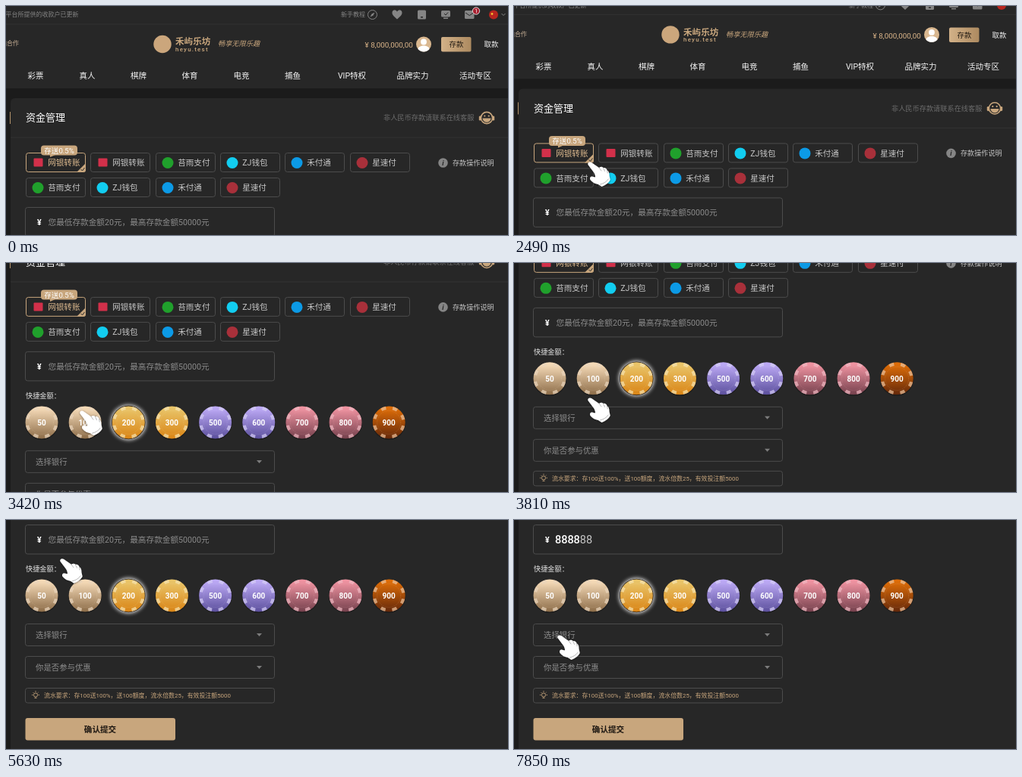
An HTML page for the animation above (8 s loop, 661 by 303 pixels).

```html
<!DOCTYPE html>
<html lang="zh-CN">
<head>
<meta charset="utf-8">
<title>资金管理</title>
<style>
  html, body { margin: 0; width: 100%; height: 100%; overflow: hidden; background: #1b1b1b; }
  svg { display: block; width: 100%; height: 100%; }
  text { font-family: Roboto, 'Noto Sans CJK SC', 'Noto Sans CJK', sans-serif; }
</style>
</head>
<body>
<svg id="stage" viewBox="0 0 661 303" preserveAspectRatio="none">
  <defs>
    <filter id="glow" x="-50%" y="-50%" width="200%" height="200%"><feGaussianBlur stdDeviation="2.6"/></filter>
    <filter id="soft" x="-50%" y="-50%" width="200%" height="200%">
      <feDropShadow dx="0" dy="0.5" stdDeviation="0.8" flood-color="#000" flood-opacity=".55"/>
    </filter>
    <linearGradient id="deposit"><stop stop-color="#d2b188"/><stop offset="1" stop-color="#ad8a60"/></linearGradient>
  </defs>
  <g id="page"></g>
  <g id="hand">
    <path filter="url(#soft)" fill="#fff" d="M.5 4C-.5 1 2.5-.5 5 1L15 8C17 6.500 19 6.300 20.500 8C23 7.500 25 9 25.700 11.500C28 12.500 28.500 15.500 28.500 18.500L29.700 24C27.500 28 23 31.500 18.500 33L14 30C10.500 29.500 6 27.500 3.500 24C2 21 4.500 18.500 7 20L10 20.500C10.300 19 9.500 16.500 8 14Z"/>
    <path fill="none" stroke="#888" stroke-width=".6" stroke-linecap="round" d="M15 8L18 12M20.500 8L22.500 12.500M25.700 11.500L26.200 15M16.500 30C21 29 25 26.500 27.300 23"/>
  </g>
</svg>
<script>
const LOOP = 8000;
const GOLD = '#c8a67d', PANEL = '#272727', LINE = '#4c4c4c', HAIR = '#333';
const NS = 'http://www.w3.org/2000/svg';
const page = document.getElementById('page');
const hand = document.getElementById('hand');
const defs = document.querySelector('defs');

function add(tag, attrs, parent = page) {
  const el = document.createElementNS(NS, tag);
  for (const k in attrs) el.setAttribute(k, attrs[k]);
  parent.appendChild(el);
  return el;
}
const rect = (x, y, width, height, fill, more) => add('rect', { x, y, width, height, fill, ...more });
const disc = (cx, cy, r, fill, more) => add('circle', { cx, cy, r, fill, ...more });
const path = (d, fill, more) => add('path', { d, fill, ...more });
const stroke = (d, color, width = 1) => path(d, 'none', { stroke: color, 'stroke-width': width });
const frame = (x, y, w, h, color = LINE) =>
  rect(x + .5, y + .5, w - 1, h - 1, 'none', { stroke: color, rx: 3 });

// y is the vertical middle of the line
function label(str, x, y, size, fill, more) {
  const el = add('text', { x, y: y + size * .37, 'font-size': size, fill, ...more });
  el.textContent = str;
  return el;
}
const centred = (str, x, y, size, fill, more) =>
  label(str, x, y, size, fill, { 'text-anchor': 'middle', ...more });

function topBar() {
  const grey = '#858585';
  rect(0, 0, 661, 109, PANEL);
  rect(0, 23.5, 661, 1, HAIR);
  label('平台所提供的收款户已更新', -.5, 11.5, 8, grey);
  label('新手教程', 441, 11.5, 8, grey);
  disc(482.5, 11.5, 6, 'none', { stroke: grey });
  path('M485.500 8.500L483.500 12.500L479.500 14.500L481.500 10.500Z', grey);
  path('M515 17.500C511 14 508.500 12 508.500 9C508.500 5 513 4 515 7.500C517 4 521.500 5 521.500 9C521.500 12 519 14 515 17.500Z', grey);
  rect(542, 5.5, 11, 12, grey, { rx: 1.5 });
  rect(546, 14, 3, 1.5, PANEL);
  rect(573, 6, 12, 8.5, grey, { rx: 1.5 });
  rect(576, 15.5, 6, 1.5, grey);
  stroke('M577 10L579 12L582 8.500', PANEL);
  rect(604, 6, 12.5, 11, grey, { rx: 1.5 });
  stroke('M605 9L610.300 12.500L615.500 9', PANEL);
  disc(619, 6.5, 4.6, '#a82030', { stroke: '#eee', 'stroke-width': .9 });
  centred('1', 619, 6.5, 7.5, '#fff');
  disc(642, 11.5, 6, '#b8261f');
  disc(640, 10.5, 1.4, '#f2c230');
  stroke('M652.500 10L655 12.500L657.500 10', grey);
}

function header() {
  label('站合作', 17, 49.5, 8, '#c4ad94', { 'text-anchor': 'end' });
  disc(206, 50.5, 11.7, '#cba67c');
  label('禾屿乐坊', 223, 47, 11.6, GOLD, { 'font-weight': 700 });
  label('heyu.test', 223, 57, 8, GOLD, { 'font-weight': 500, 'letter-spacing': 1.2 });
  label('畅享无限乐趣', 279, 50, 9.2, GOLD, { 'font-style': 'italic' });
  label('¥ 8,000,000,00', 472.5, 51.5, 9.9, '#dcb68a');
  disc(550, 50.5, 10, '#d9b78f');
  disc(550, 47.5, 3.9, '#fff');
  path('M542.500 57C543 51 557 51 557.500 57C554 61.500 546 61.500 542.500 57Z', '#fff');
  rect(573, 41, 39.5, 19.5, 'url(#deposit)', { rx: 2 });
  centred('存款', 593, 51, 9.4, '#241c14');
  centred('取款', 639, 51, 9.4, '#f2f2f2');

  const nav = { 彩票: 39, 真人: 107, 棋牌: 174.5, 体育: 242, 电竞: 310, 捕鱼: 377.5, VIP特权: 455.5, 品牌实力: 535.5, 活动专区: 618 };
  for (const name in nav) centred(name, nav[name], 92.5, 10.5, '#f4f4f4');
}

function payButton(col, row, name, color, square) {
  const x = Math.round(26 + col * 85.3), y = 194 + row * 33, on = !col && !row;
  frame(x, y, 79, 26, on ? GOLD : LINE);
  if (square) rect(x + 10.5, y + 7.5, 12, 11, color, { rx: 1 });
  else disc(x + 16, y + 13.5, 7.5, color);
  label(name, x + 29.2, y + 13.5, 10.6, on ? '#dcb98e' : '#c6c6c6');
  if (on) {
    path(`M${x + 79} ${y + 14}V${y + 23}Q${x + 79} ${y + 26} ${x + 76} ${y + 26}H${x + 67}Z`, GOLD);
    stroke(`M${x + 72.5} ${y + 22}L${x + 74.5} ${y + 24}L${x + 77.5} ${y + 20}`, '#2a2a2a');
  }
}

function payments() {
  path('M6 570V128Q6 122 12 122H661V570Z', PANEL);
  rect(6, 173.5, 655, 1, HAIR);
  rect(5, 140, 1, 16, '#b3936a');
  label('资金管理', 26, 147.5, 13, '#fff', { 'font-weight': 500 });
  label('非人民币存款请联系在线客服', 497, 148, 9.2, '#6c6c6c');

  // headset face
  disc(633, 148, 7.6, 'none', { stroke: GOLD, 'stroke-width': 1.6 });
  rect(622.8, 145.5, 3, 6, GOLD, { rx: 1.3 });
  rect(640.2, 145.5, 3, 6, GOLD, { rx: 1.3 });
  path('M627.500 148.500H638.500C638 155.500 628 155.500 627.500 148.500Z', GOLD);
  disc(630.3, 145.5, 1.1, GOLD);
  disc(635.7, 145.5, 1.1, GOLD);

  const kinds = [['网银转账', '#d2304a', true], ['苔雨支付', '#20a02c'], ['ZJ钱包', '#12cdf0'],
                 ['禾付通', '#0c9ae6'], ['星速付', '#a8303a']];
  [0, 0, 1, 2, 3, 4].forEach((k, i) => payButton(i, 0, ...kinds[k]));
  [1, 2, 3, 4].forEach((k, i) => payButton(i, 1, ...kinds[k]));

  rect(46, 184.5, 48, 13, GOLD, { rx: 4 });
  path('M58 197H65L58 200Z', GOLD);
  centred('存送0.5%', 70, 191.2, 9.6, '#fff');

  disc(575.5, 207.5, 6.3, '#858585');
  centred('i', 575.5, 207.5, 9, PANEL, { 'font-weight': 700, 'font-style': 'italic' });
  label('存款操作说明', 588, 207.5, 9.1, '#c4c4c4');
}

function chip(i, value, [top, bottom, rim]) {
  const x = 47 + i * 57.15, y = 360, id = 'chip' + i;
  const grad = add('linearGradient', { id, x1: 0, y1: 0, x2: 0, y2: 1 }, defs);
  add('stop', { offset: .08, 'stop-color': top }, grad);
  add('stop', { offset: 1, 'stop-color': bottom }, grad);
  if (value === 200) {
    disc(x, y, 23.5, '#fff', { filter: 'url(#glow)', opacity: .85 });
    disc(x, y, 22.3, '#2b2118');
  } else {
    disc(x, y + 1, 22, '#000', { opacity: .3 });
  }
  disc(x, y, 21.5, `url(#${id})`);
  const arc = 2 * Math.PI * 19.4 / 8;
  disc(x, y, 19.4, 'none', {
    stroke: rim, 'stroke-width': 4.2, opacity: .72,
    'stroke-dasharray': `${arc * .42} ${arc * .58}`, transform: `rotate(13 ${x} ${y})`
  });
  disc(x, y, 15.5, 'none', { stroke: rim, 'stroke-width': .6, opacity: .35, 'stroke-dasharray': '1 1' });
  centred(value, x, y, 10, '#fff', { 'font-weight': 700 });
}

function select(y, name) {
  frame(25, y, 329, 30);
  label(name, 39, y + 15, 10.4, '#8e8e8e');
  path(`M330 ${y + 13}H337L333.500 ${y + 17}Z`, '#7c7c7c');
}

function form() {
  frame(25, 266, 329, 39.5);
  label('¥', 41, 286, 10.5, '#fff', { 'font-weight': 700 });
  label('快捷金额：', 26, 325, 9.2, '#e6e6e6', { 'font-weight': 500 });

  const tan = ['#f4d9b6', '#8c6c48', '#ead6bd'], amber = ['#e9c468', '#d98415', '#f7e3b0'],
        violet = ['#bba8f4', '#5b4f9c', '#d6cdf7'], rose = ['#ee92a0', '#74404c', '#f2b9c2'],
        rust = ['#dc6c08', '#64280a', '#eec39c'];
  const colors = [tan, tan, amber, amber, violet, violet, rose, rose, rust];
  [50, 100, 200, 300, 500, 600, 700, 800, 900].forEach((v, i) => chip(i, v, colors[i]));

  select(397, '选择银行');
  select(440, '你是否参与优惠');

  frame(25, 482, 329, 20.5);
  disc(39, 491.5, 2.6, 'none', { stroke: GOLD, 'stroke-width': .9 });
  stroke('M37.500 495.500H40.500M39 486V487.500M34 491.500H35.300M42.700 491.500H44M35.500 488L36.300 488.800M42.500 488L41.700 488.800', GOLD, .9);
  label('流水要求：存100送100%，送100额度，流水倍数25，有效投注额5000', 50, 492.5, 7.9, GOLD);

  rect(25.5, 522, 197.5, 29.5, GOLD, { rx: 3 });
  centred('确认提交', 124, 537, 10.6, '#1c1611', { 'font-weight': 700 });
}

rect(0, 0, 661, 570, '#1b1b1b');
topBar();
header();
payments();
form();
const hint = label('您最低存款金额20元，最高存款金额50000元', 55.5, 286, 10.65, '#8b8b8b');
const digits = Array.from({ length: 6 }, (_, i) =>
  label('8', 54 + i * 8.2, 286, 14.6, i < 4 ? '#fff' : '#c9c9c9', { 'font-weight': i < 4 ? 500 : 400 }));

// [time, value...] rows, joined by a smooth curve that rests at turning points
const scrollSteps = [[2340, 0], [2490, 12.5], [3030, 87.5], [3810, 207], [4290, 260]];
const handSteps = [
  [0, 674, 76, 1.4], [500, 588, 50, 1.4], [840, 588, 50, 1.4], [1500, 87, 201, 1.4],
  [1620, 87, 201, 1.4], [1860, 97, 206, 1], [3030, 97, 206, 1], [3810, 97, 178, 1],
  [4290, 97, 163, 1], [5120, 97, 163, 1], [5630, 71, 51, 1], [5850, 63, 25, 1],
  [6850, 63, 25, 1], [7200, 91, 50, 1.4], [7520, 83, 75, 1.4], [7850, 57, 152, 1]
];

function slope(steps, i, c) {
  const a = steps[i - 1], b = steps[i], d = steps[i + 1];
  if (!a || !d) return 0;
  const before = (b[c] - a[c]) / (b[0] - a[0]), after = (d[c] - b[c]) / (d[0] - b[0]);
  return before * after > 0 ? 2 * before * after / (before + after) : 0;
}

function sample(steps, t, c) {
  const last = steps.length - 1;
  if (t <= steps[0][0]) return steps[0][c];
  if (t >= steps[last][0]) return steps[last][c];
  const i = steps.findIndex(s => s[0] > t) - 1;
  const a = steps[i], b = steps[i + 1], span = b[0] - a[0], p = (t - a[0]) / span, q = 1 - p;
  return a[c] * q * q * (1 + 2 * p) + b[c] * p * p * (1 + 2 * q)
    + span * p * q * (slope(steps, i, c) * q - slope(steps, i + 1, c) * p);
}

function draw(t) {
  page.setAttribute('transform', `translate(0 ${-sample(scrollSteps, t, 1)})`);
  const [x, y, s] = [1, 2, 3].map(c => sample(handSteps, t, c));
  hand.setAttribute('transform', `translate(${x} ${y}) scale(${s})`);
  hint.setAttribute('opacity', Math.min(1, Math.max(0, (6350 - t) / 100)));
  digits.forEach((d, i) => d.setAttribute('opacity', t >= 6600 + i * 130 ? 1 : 0));
}

const start = performance.now();
function tick() {
  draw((performance.now() - start) % LOOP);
  requestAnimationFrame(tick);
}
tick();
</script>
</body>
</html>
```
